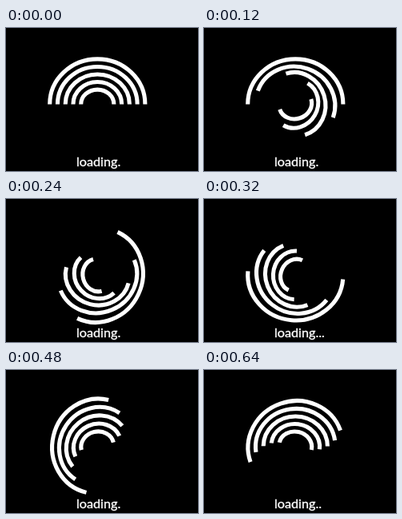
An HTML page that plays this animation: 240 by 179 pixels, repeating every 0.68 s.

```html
<!DOCTYPE html>
<html lang="en">
<head>
<meta charset="utf-8">
<title>Loading</title>
<style>
  html, body { margin: 0; width: 100%; height: 100%; overflow: hidden; background: #000; }
  svg { display: block; width: 100vw; height: 100vh; }
  path { fill: none; stroke: #fff; stroke-width: 5.1; }
  text { fill: #fff; stroke: #fff; stroke-width: .35; font: 16.2px Lato, Carlito, sans-serif; }
</style>
</head>
<body>
<svg viewBox="0 0 240 179">
  <g id="arcs" transform="translate(114.3 95.4)"></g>
  <text id="label" x="88" y="173">loading.</text>
</svg>
<script>
  const STEP = 40, STEPS = 17, ARCS = 5;
  const group = document.getElementById('arcs');
  const label = document.getElementById('label');

  const arcs = Array.from({ length: ARCS }, (_, i) => {
    const rx = 59.6 - 9.75 * i, ry = 56.5 - 9.55 * i;
    const path = document.createElementNS('http://www.w3.org/2000/svg', 'path');
    path.setAttribute('d', `M${-rx} 0A${rx} ${ry} 0 0 1 ${rx} 0`);
    return group.appendChild(path);
  });

  // Progress of the outer arc; each inner arc runs one unit ahead.
  const progress = t => 0.5 + (t - 160) * (t < 160 ? 0.029 : 0.0216);

  // Quartic ease-out, starting abruptly from rest.
  const angle = p => 387 * (1 - (1 - Math.max(0, p) / 26.4) ** 4);

  function draw(step) {
    const p = progress(step * STEP);
    arcs.forEach((arc, i) => arc.setAttribute('transform', `rotate(${angle(p + i).toFixed(2)})`));
    label.textContent = 'loading' + '.'.repeat(step % 3 + 1);
  }

  const start = performance.now();
  let last = -1;
  function tick() {
    const step = Math.floor((performance.now() - start) / STEP) % STEPS;
    if (step !== last) draw(last = step);
    requestAnimationFrame(tick);
  }
  tick();
</script>
</body>
</html>
```
